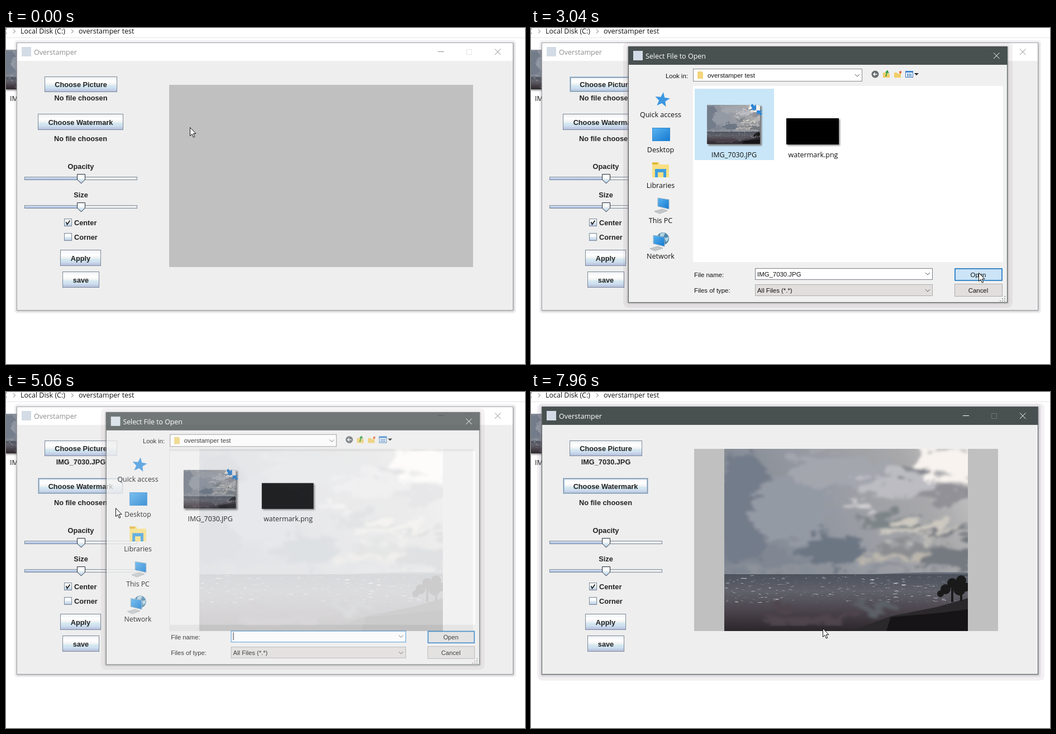
An HTML page that plays this animation: 929 px wide and 603 px high, repeating every 7.99 s.

```html
<!DOCTYPE html>
<html lang="en">
<head>
<meta charset="utf-8">
<title>Overstamper</title>
<style>
html, body { margin: 0; width: 100%; height: 100%; overflow: hidden; background: #fff; }
svg { display: block; width: 929px; height: 603px; }
text { fill: #111; }
.shell { font: 12.5px "Open Sans", "Noto Sans", sans-serif; }
.swing { font: bold 12.75px "Liberation Sans", Arial, sans-serif; fill: #222; }
.form { font: 11.4px "Liberation Sans", Arial, sans-serif; }
.mid { text-anchor: middle; }
</style>
</head>
<body>
<svg id="stage" viewBox="0 0 929 603"></svg>
<script>
const LOOP = 7990;
const APP = 'Overstamper', FOLDER = 'overstamper test';
const FILES = ['IMG_7030.JPG', 'watermark.png'];

// ---------- markup helpers ----------
const rect = (x, y, w, h, fill, more = '') =>
  `<rect x="${x}" y="${y}" width="${w}" height="${h}" fill="${fill}" ${more}/>`;
const frame = (x, y, w, h, fill, stroke, more = '') =>
  rect(x + .5, y + .5, w - 1, h - 1, fill, `stroke="${stroke}" ${more}`);
const path = (d, fill, more = '') => `<path d="${d}" fill="${fill}" ${more}/>`;
const line = (d, stroke, width = 1, more = '') =>
  path(d, 'none', `stroke="${stroke}" stroke-width="${width}" ${more}`);
const text = (x, y, cls, str, more = '') => `<text x="${x}" y="${y}" class="${cls}" ${more}>${str}</text>`;
const group = (id, body, more = '') => `<g id="${id}" ${more}>${body}</g>`;
const gradient = (id, stops, dir = 'x2="0" y2="1"') => `<linearGradient id="${id}" ${dir}>` +
  stops.map(([o, c]) => `<stop offset="${o}" stop-color="${c}"/>`).join('') + '</linearGradient>';
const photo = (x, y, w, h) => `<use href="#photo" x="${x}" y="${y}" width="${w}" height="${h}"/>`;
const chevron = (x, y) => line(`M${x - 4} ${y - 2}l4 4 4-4`, '#555');

// ---------- seaside photo, 436 x 327 ----------
const clouds = [
  [20, 100, 50, 110, '#737c8a'], [110, 100, 75, 60, '#949aa4'], [190, 30, 90, 30, '#a3a6ad'],
  [395, 14, 75, 32, '#f8f3ee'], [300, 50, 70, 18, '#bcbcc2'], [325, 27, 24, 8, '#85878f'],
  [235, 88, 28, 8, '#d2cfd2'], [400, 72, 60, 16, '#939198'], [285, 116, 65, 9, '#7d8488'],
  [345, 136, 85, 15, '#cdc9c1'], [390, 141, 60, 7, '#7a7e84'], [185, 170, 55, 32, '#6c7683'],
  [80, 195, 60, 20, '#808792'], [320, 166, 70, 8, '#8a8c8f'], [300, 184, 70, 8, '#bdb7ad'],
  [395, 186, 50, 18, '#747980'], [180, 212, 200, 8, '#8d9199']
];
const photoSymbol = `<symbol id="photo" viewBox="0 0 436 327" preserveAspectRatio="none">` +
  rect(0, 0, 436, 327, 'url(#sky)') +
  `<g filter="url(#cloudy)">` + clouds.map(([x, y, rx, ry, c]) =>
    `<ellipse cx="${x}" cy="${y}" rx="${rx}" ry="${ry}" fill="${c}"/>`).join('') + '</g>' +
  path('M270 225q80-5 166-3v4H270z', '#666c78') +
  rect(0, 225, 436, 102, 'url(#sea)') +
  rect(0, 227, 436, 50, '#fff', 'filter="url(#sparkle)"') +
  `<g filter="url(#cloudy)">` +
  '<ellipse cx="255" cy="276" rx="45" ry="10" fill="#5b6066"/>' +
  '<ellipse cx="140" cy="295" rx="80" ry="14" fill="#4f444e"/></g>' +
  path('M225 327L300 300 380 284 436 268V327z', '#2b282b') +
  path('M290 327L298 302 390 294 436 288V327z', '#161416') +
  [[396, 252, 9], [408, 241, 9], [424, 236, 9], [421, 252, 11], [387, 260, 6], [432, 248, 8]].map(([x, y, r]) =>
    `<circle cx="${x}" cy="${y}" r="${r}" fill="#1a1a1b"/>`).join('') +
  line('M408 275V248M424 273V245', '#1a1a1b', 4) + '</symbol>';

const wide = 'x="-20%" y="-20%" width="140%" height="140%"';
const defs = '<defs>' +
  gradient('sky', [[0, '#7d8591'], [.45, '#999ca3'], [.75, '#a8a8aa'], [1, '#c9c8c8']], 'x1="0" y1=".4" x2="1" y2="0"') +
  gradient('sea', [[0, '#4c525c'], [.3, '#60616a'], [.65, '#4a434b'], [1, '#2b262a']]) +
  gradient('metal', [[0, '#eef0f3'], [.3, '#fff'], [.5, '#f1f2f3'], [.6, '#d3e8f1'], [.75, '#cfe0ef'], [1, '#b3bbdb']]) +
  gradient('track', [[0, '#f4f8fc'], [.4, '#c3d2ea'], [1, '#9fb2dc']]) +
  gradient('screen', [[0, '#5ab4f0'], [1, '#1479d0']], 'x2="1" y2="1"') +
  `<filter id="cloudy" ${wide}><feTurbulence baseFrequency=".015 .035" numOctaves="4" seed="4"/>` +
  '<feDisplacementMap in="SourceGraphic" scale="60" xChannelSelector="R" yChannelSelector="G"/>' +
  '<feGaussianBlur stdDeviation="2.5"/></filter>' +
  '<filter id="sparkle" x="0" y="0" width="1" height="1"><feTurbulence baseFrequency=".07 .35" numOctaves="3" seed="8"/>' +
  '<feColorMatrix values="0 0 0 0 .72  0 0 0 0 .73  0 0 0 0 .76  3 0 0 0 -1.5"/></filter>' +
  `<filter id="shade" ${wide}><feGaussianBlur stdDeviation="1.5"/></filter>` +
  '<clipPath id="view"><rect x="292" y="102" width="544" height="327"/></clipPath>' +
  photoSymbol + '</defs>';

// ---------- main window ----------
const button = (id, x, y, w, h, label) =>
  frame(x, y, w, h, 'url(#metal)', '#7a8a99', `id="${id}Face"`) +
  group(id + 'Hover', frame(x, y, w, h, 'none', '#b8cfe5') +
    frame(x + 1, y + 1, w - 2, h - 2, 'none', '#7a8a99') +
    frame(x + 2, y + 2, w - 4, h - 4, 'none', '#b8cfe5'), 'display="none"') +
  text(x + w / 2, y + h / 2 + 5, 'swing mid', label);

const slider = (y, label) => text(134, y - 17, 'swing mid', label) +
  frame(33, y - 3, 202, 6, '#eee', '#7a8a99') +
  frame(33, y - 3, 102, 6, 'url(#track)', '#7a8a99') +
  path(`M127.5 ${y - 7.5}h14v9.500l-7 7-7-7z`, 'url(#metal)', 'stroke="#25303c"');

const checkbox = (y, label, on) => frame(104, y - 7, 14, 14, 'url(#metal)', '#7a8a99') +
  (on ? line(`M107.500 ${y - 1}l2 4.500 5-7`, '#222', 1.8) : '') + text(122, y + 5, 'swing', label);

const titleBar = (id, bar, ink, faint, edge) => group(id,
  frame(19, 26, 889, 481, 'none', edge) + rect(20, 27, 887, 32, bar) +
  text(50, 48, 'shell', APP, `style="fill:${ink}"`) +
  line('M773 42.500h11', ink) + frame(824, 38, 10, 10, 'none', faint) +
  line('M875 37.500l10.500 10.500m0-10.500l-10.500 10.500', ink));

const mainWindow =
  group('glow', rect(11, 20, 908, 498, '#604860', 'rx="9" opacity=".08"')) +
  rect(15, 22, 898, 490, '#505070', 'rx="5" opacity=".08"') +
  rect(19, 27, 890, 481, '#777', 'filter="url(#shade)" opacity=".6"') +
  rect(20, 27, 887, 479, '#eee') +
  titleBar('idle', '#fff', '#8c8c8c', '#e6e6e6', '#a5a5a8') +
  titleBar('active', '#495150', '#fff', '#6e7573', '#5a6260') +
  rect(28, 34, 17, 17, '#d3dce6') +
  button('pic', 69, 87, 130, 28, 'Choose Picture') +
  text(134, 130, 'swing mid', 'No file choosen', 'id="picName"') +
  button('mark', 57, 154, 153, 29, 'Choose Watermark') +
  text(133.500, 203, 'swing mid', 'No file choosen') +
  slider(270, 'Opacity') + slider(321, 'Size') +
  checkbox(349, 'Center', true) + checkbox(375, 'Corner', false) +
  button('apply', 97, 398, 73, 29, 'Apply') + button('save', 101, 437, 66, 29, 'save') +
  rect(292, 102, 544, 327, '#c0c0c0') +
  group('preview', photo(346, 102, 436, 327), 'clip-path="url(#view)"');

// ---------- file dialog ----------
const monitor = (x, y) => path(`M${x} ${y}l20 3v17l-20-5z`, 'url(#screen)', 'stroke="#9fb4c4"') +
  path(`M${x - 6} ${y + 24}l14-4 9 3-14 5z`, '#c4c8ca', 'stroke="#9a9fa2" stroke-width=".7"');
const star = 'M235 115' + [...Array(10).keys()].slice(1).map(i => {
  const r = i % 2 ? 6 : 14, a = i * Math.PI / 5;
  return `L${(235 + r * Math.sin(a)).toFixed(1)} ${(129 - r * Math.cos(a)).toFixed(1)}`;
}).join('') + 'z';

const places = path(star, '#3d97e0', 'transform="rotate(8 235 129)"') +
  frame(217, 179, 32, 24, 'url(#screen)', '#2b8ad6') +
  path('M217 241h12l2 4h16v23h-30z', '#f8e083') + path('M217 241h10v4h-10z', '#e2b93b') +
  path('M222 268v-15h20v15h-5v-9h-10v9z', '#3f9fe0') +
  monitor(227, 305) +
  '<circle cx="236" cy="378" r="11" fill="#4d87ad"/>' +
  path('M231 369q6-3 9 0l-3 5-6 1zM239 377l7-2q1 6-4 9z', '#b4d3de') + monitor(219, 372) +
  ['Quick access', 'Desktop', 'Libraries', 'This PC', 'Network'].map((name, i) =>
    text(232, 159.500 + i * 63.600, 'shell mid', name)).join('');

const toolbar = '<circle cx="616" cy="83" r="6.5" fill="#666b6e"/>' +
  line('M620 83h-7m3-3l-3 3 3 3', '#fff', 1.4) +
  path('M630 80h5l1 2h6v7h-12z', '#f0cd68') + line('M635 87l3-9m-3 2l3-3 2 4', '#2f9b3b', 1.8) +
  path('M650 80h5l1 2h6v7h-12z', '#f0cd68') + path('M659 78l4-1v4l-3 1z', '#e2632f') +
  frame(670, 77, 14, 12, '#fff', '#2e6fb5') + rect(670, 77, 14, 3, '#3c84cf') +
  line('M673 83h8M673 86h8', '#2e6fb5', 2, 'stroke-dasharray="2 1"') +
  path('M686 81h8l-4 4z', '#222');

const items =
  [293, 435].map((x, i) => frame(x, 109, 142, 128, '#c8e6f7', '#c8e6f7', `id="item${i}"`)).join('') +
  rect(317, 140, 96, 71, '#777', 'filter="url(#shade)"') + photo(315, 138, 95, 70) +
  path('M393 139l3-3 4 4 3-3v10h-10l3-3zM414 154l-3 3-4-4-3 3v-8h10l-3 3z', '#2f86d6') +
  rect(459, 164, 94, 47, '#888', 'filter="url(#shade)"') + rect(457, 162, 94, 47, '#000') +
  FILES.map((name, i) => text(363.500 + i * 141.500, 231.500, 'shell mid', name)).join('');

const grip = [[0, 0], [0, 4], [0, 8], [-4, 4], [-4, 8], [-8, 8]].map(([x, y]) =>
  rect(847 + x, 481 + y, 2, 2, '#a8a8a8')).join('');

const dialog = group('dialog',
  rect(165, 25, 697, 477, '#806878', 'rx="9" opacity=".1"') +
  rect(173, 33, 681, 461, '#777', 'filter="url(#shade)" opacity=".7"') +
  frame(174, 33, 679, 460, '#f0f0f0', '#5a6260') +
  rect(174, 33, 679, 33, '#495150') + rect(183, 41, 17, 17, '#d3dce6') +
  text(205, 55, 'shell', 'Select File to Open', 'style="fill:#fff"') +
  line('M828 44.500l10.500 10.500m0-10.500l-10.500 10.500', '#fff') +
  text(241, 90, 'form', 'Look in:') +
  frame(290, 73, 303, 23, '#fff', '#8c8c8c') + path('M298 78h8l2 2v11h-10z', '#f3d57c') +
  text(316, 89, 'form', FOLDER) + chevron(584, 85) + toolbar + places +
  rect(290, 104, 555, 316, '#fff') + items +
  text(292, 447, 'form', 'File name:') + text(292, 475, 'form', 'Files of type:') +
  frame(401, 431, 318, 21, '#fff', '#0078d7', 'id="nameBox"') +
  text(405, 445.500, 'form', '', 'id="fileName"') + rect(405, 434, 1, 14, '#000', 'id="caret"') +
  chevron(710, 441) +
  frame(401, 460, 318, 21, '#e2dede', '#adadad') + text(405, 475, 'form', 'All Files (*.*)') + chevron(710, 471) +
  rect(759, 432, 84, 21, '#e1e1e1', 'id="open" stroke="#2079c4" stroke-width="1.7"') +
  text(800.500, 447, 'form mid', 'Open') +
  frame(758, 459, 86, 23, '#e2dede', '#adadad') + text(800.500, 475, 'form mid', 'Cancel') + grip);

const explorer = line('M0 17.500H929', '#e4e4e4') +
  text(-6, 10, 'shell', 'C') + text(26, 10, 'shell', 'Local Disk (C:)') + text(130, 10, 'shell', FOLDER) +
  line('M13 2.500l3.500 3.500-3.500 3.500M117 2.500l3.500 3.500-3.500 3.500', '#666') +
  rect(0, 41, 96, 71, '#888', 'filter="url(#shade)"') + photo(-1, 39, 95, 71) +
  text(7, 130.500, 'shell', FILES[0]);

const pointer = group('cursor', path('M.5 .5V15.500L4 12.300 6.500 18.200 8.800 17.200 6.300 11.500H11z', '#fff',
  'stroke="#111" stroke-linejoin="round"'));

document.getElementById('stage').innerHTML = defs + explorer + mainWindow + dialog + pointer;

// ---------- timeline ----------
const sessions = [
  { start: 1200, shown: 1230, pick: 2060, press: 3030, close: 3200, ease: 210 },
  { start: 4961, shown: 4980, pick: 5720, press: 6850, close: 6980, ease: 210 }
];
const CLOSE_TIME = 150, LOADED = 4150;

const cursorKeys = [ // time, x, y
  [0, 329, 178], [130, 329, 178], [550, 176, 95], [1290, 176, 95], [1930, 355, 163], [2190, 355, 163],
  [2830, 799, 432], [2920, 801, 441], [3040, 801, 439], [3430, 801, 439], [4740, 187, 171], [4870, 187, 171],
  [5060, 196, 208], [5660, 505, 185], [6080, 505, 185], [6210, 554, 288], [6510, 733, 430], [6680, 800, 439],
  [7130, 800, 439], [7330, 779, 438], [7960, 522, 424], [7990, 522, 424]
];

// Monotone cubic through the keys: rests stay still, waypoints pass smoothly.
const slope = (i, k) => i < 0 || i > cursorKeys.length - 2 ? 0 :
  (cursorKeys[i + 1][k] - cursorKeys[i][k]) / (cursorKeys[i + 1][0] - cursorKeys[i][0]);
const tangent = (i, k) => {
  const a = slope(i - 1, k), b = slope(i, k);
  return a * b > 0 ? 2 * a * b / (a + b) : 0;
};
function cursorAt(t) {
  const i = Math.max(0, cursorKeys.findIndex(key => key[0] > t) - 1);
  const a = cursorKeys[i], b = cursorKeys[i + 1], span = b[0] - a[0], u = (t - a[0]) / span, v = 1 - u;
  return [1, 2].map(k => a[k] * (1 + 2 * u) * v * v + b[k] * u * u * (3 - 2 * u) +
    span * (tangent(i, k) * u * v * v - tangent(i + 1, k) * u * u * v));
}

const $ = id => document.getElementById(id);
const set = (id, name, value) => $(id).setAttribute(name, value);
const show = (id, on) => set(id, 'display', on ? 'inline' : 'none');
const within = (t, a, b) => t >= a && t < b;

function drawDialog(t, x, y) {
  const s = sessions.find(s => within(t, s.shown, s.close + CLOSE_TIME));
  show('dialog', s);
  if (!s) return;
  const entering = 1 - (1 - Math.min(1, (t - s.start) / s.ease)) ** 3;
  const leaving = Math.max(0, (t - s.close) / CLOSE_TIME);
  const zoom = .9 + .1 * entering - .1 * leaving;
  set('dialog', 'transform', `translate(513 262.5) scale(${zoom}) translate(-513 -262.5)`);
  set('dialog', 'opacity', entering ** 1.6 * (1 - leaving));

  const file = sessions.indexOf(s), picked = t >= s.pick, focused = t < s.pick + 130;
  [293, 435].forEach((left, i) => {
    const over = within(x, left, left + 142) && within(y, 109, 237);
    const chosen = picked && i === file;
    show('item' + i, over || chosen);
    set('item' + i, 'fill', chosen ? '#c8e6f7' : '#e5f3fb');
    set('item' + i, 'stroke', chosen && over ? '#99d1f2' : chosen ? '#c8e6f7' : '#e5f3fb');
  });
  $('fileName').textContent = picked ? FILES[file] : '';
  set('nameBox', 'stroke', focused ? '#2b88d0' : '#7a7f86');
  show('caret', focused);
  const overOpen = within(x, 758, 844) && within(y, 431, 454);
  set('open', 'fill', within(t, s.press, s.close) ? '#cce4f7' : overOpen ? '#e5f1fb' : '#e1e1e1');
}

function draw(t) {
  const [x, y] = cursorAt(t);
  set('cursor', 'transform', `translate(${Math.round(x)} ${Math.round(y)})`);

  const active = within(t, 810, 1030) || within(t, 3200, 4960) || t >= 6980;
  show('active', active);
  show('idle', !active);
  show('glow', active);

  const loaded = t >= LOADED;
  show('preview', loaded);
  $('picName').textContent = loaded ? FILES[0] : 'No file choosen';
  show('picHover', within(t, 490, LOADED));
  show('markHover', t >= 4600);
  set('picFace', 'fill', within(t, 810, 870) ? '#b8cfe5' : 'url(#metal)');
  set('markFace', 'fill', within(t, 4870, 4930) ? '#b8cfe5' : 'url(#metal)');
  drawDialog(t, x, y);
}

function tick() {
  draw(performance.now() % LOOP);
  requestAnimationFrame(tick);
}
tick();
</script>
</body>
</html>
```
